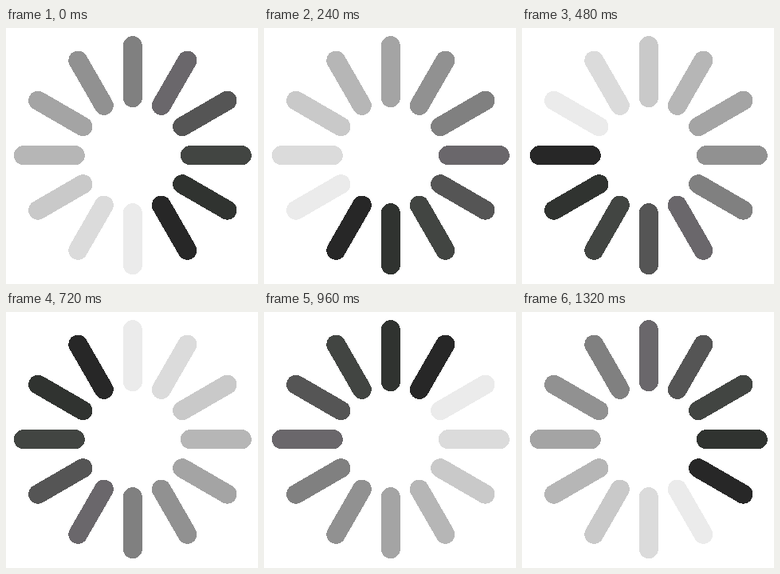
Animation of 316 by 320 pixels, one loop 1440 ms. Source, as an HTML page:

```html
<!DOCTYPE html>
<html lang="en">
<head>
<meta charset="utf-8">
<title>Loading spinner</title>
<style>
  html, body { margin: 0; width: 100%; height: 100%; overflow: hidden; background: #fff; }
  svg { display: block; width: 100vw; height: 100vh; }
  .bar {
    stroke-width: 24;
    stroke-linecap: round;
    shape-rendering: crispEdges;
    transform-origin: 0 0;
    transform: rotate(calc(var(--i) * 30deg));
    animation: fade 1440ms step-end infinite;
    animation-delay: calc((var(--i) - 17) * 120ms);
  }
  /* each bar lights up dark, then pales in twelve hard steps */
  @keyframes fade {
    0%      { stroke: #272727; }
    8.333%  { stroke: #303330; }
    16.666% { stroke: #424542; }
    25%     { stroke: #555555; }
    33.333% { stroke: #6a676b; }
    41.666% { stroke: #808080; }
    50%     { stroke: #919191; }
    58.333% { stroke: #a4a4a4; }
    66.666% { stroke: #b6b6b6; }
    75%     { stroke: #c9c9c9; }
    83.333% { stroke: #dbdbdb; }
    91.666% { stroke: #ebebeb; }
    100%    { stroke: #272727; }
  }
</style>
</head>
<body>
<svg id="spinner" viewBox="-158.8 -159.2 316 320"></svg>
<script>
  const spinner = document.getElementById('spinner');
  for (let i = 0; i < 12; i++) {
    const bar = document.createElementNS(spinner.namespaceURI, 'path');
    bar.setAttribute('class', 'bar');
    bar.setAttribute('d', 'M0-72V-137');
    bar.style.setProperty('--i', i);
    spinner.append(bar);
  }
</script>
</body>
</html>
```
